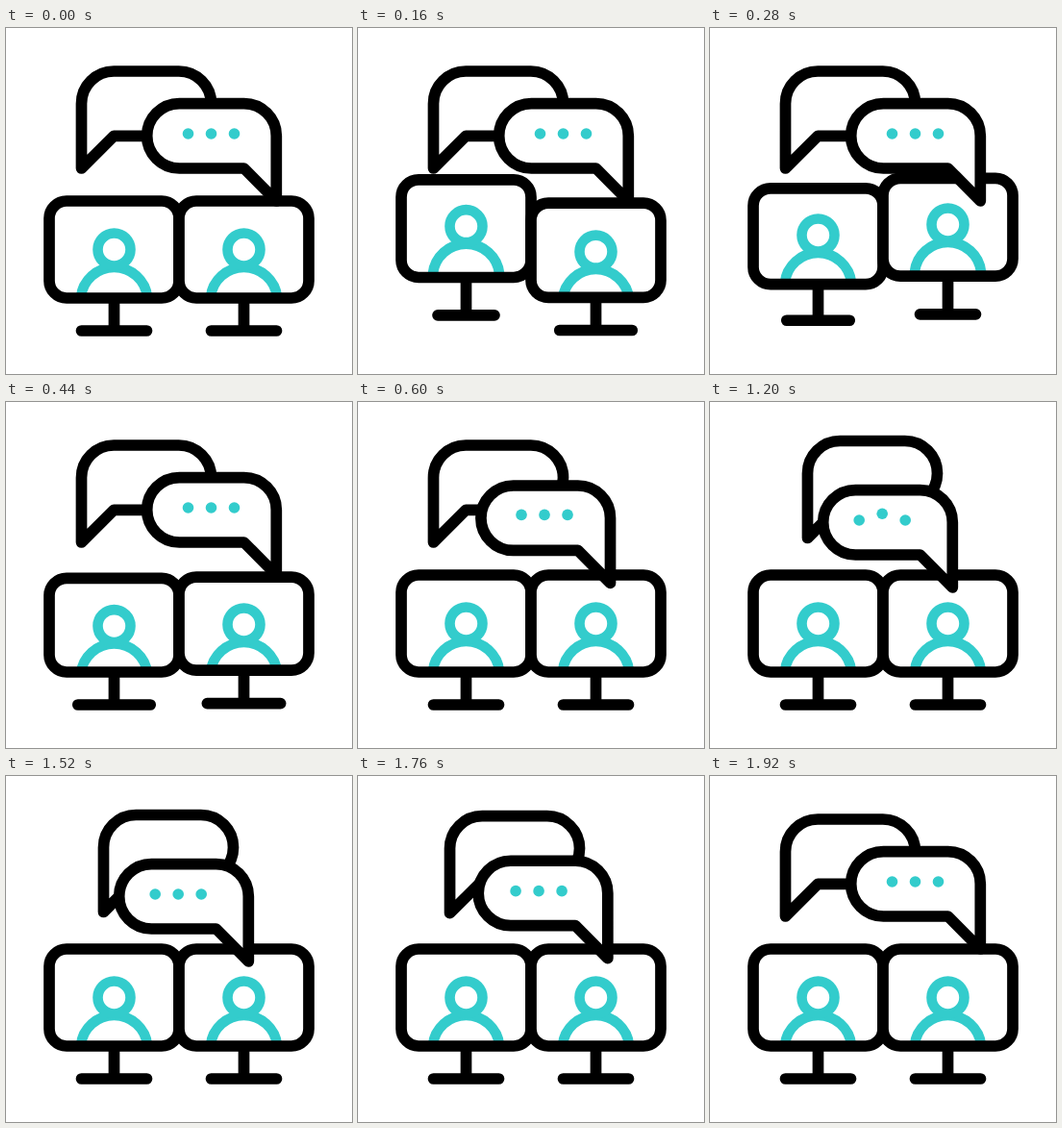
These frames come from a looping animation (360x360 px, 2000 ms). An HTML page:

```html
<!DOCTYPE html>
<html>
<head>
<meta charset="utf-8">
<style>
html, body { margin: 0; width: 100%; height: 100%; overflow: hidden; background: #fff; }
svg { display: block; width: 100vw; height: 100vh; }
.ink { fill: #fff; stroke: #000; stroke-width: 11.7; stroke-linecap: round; stroke-linejoin: round; }
.teal { fill: none; stroke: #33cccc; stroke-width: 10.6; }
.dot { fill: #33cccc; }
</style>
</head>
<body>
<svg viewBox="0 0 360 360">
  <g id="monitors"></g>
  <path id="back" class="ink" d="M78.5 146V78.7A33.7 33.7 0 0 1 112.2 45H179.8A33.7 33.7 0 0 1 179.8 112.4H112.2Z"/>
  <path id="front" class="ink" d="M281.3 180V112.3A33.7 33.7 0 0 0 247.6 78.6H180.4A33.7 33.7 0 0 0 180.4 146H247.6Z"/>
  <g id="dots"></g>
</svg>
<script>
const LOOP = 2000, STEP = 40;
const $ = id => document.getElementById(id);

function add(parent, tag, attrs) {
  const el = document.createElementNS('http://www.w3.org/2000/svg', tag);
  for (const k in attrs) el.setAttribute(k, attrs[k]);
  return parent.appendChild(el);
}

const shift = (el, x, y) => el.setAttribute('transform', `translate(${x} ${y})`);

// Smooth 0..1 ramp between times a and b
function ramp(t, a, b) {
  const p = Math.min(1, Math.max(0, (t - a) / (b - a)));
  return p * p * (3 - 2 * p);
}

// Jump poses: time, then offsets of box top, box bottom, foot, foot half-width and person
const JUMP = [
  [0, 0, 0, 0, 0, 0],
  [80, 3, 0, 0, 4, 3],
  [180, -25, -24, -18, -5.5, -27.5],
  [410, 4.5, 0, 0, 5, 3.5],
  [500, 0, 0, 0, 0, 0]
];

function jumpPose(t) {
  const pose = [0, 0, 0, 0, 0];
  for (let i = 1; i < JUMP.length; i++) {
    const a = JUMP[i - 1], b = JUMP[i], p = ramp(t, a[0], b[0]);
    pose.forEach((_, k) => pose[k] += (b[k + 1] - a[k + 1]) * p);
  }
  return pose;
}

function makeMonitor(cx, delay) {
  const g = add($('monitors'), 'g', { transform: `translate(${cx} 0)` });
  const stand = add(g, 'path', { class: 'ink' });
  const fill = add(g, 'rect', { x: -67.5, width: 135, rx: 18, fill: '#fff' });
  const person = add(g, 'g', {});
  add(person, 'path', { class: 'teal', d: 'M-34.6 280A34.8 34.8 0 0 1 34.6 280' });
  add(person, 'circle', { class: 'teal', cy: 230.5, r: 17 });
  const frame = add(g, 'rect', { x: -67.5, width: 135, rx: 18, class: 'ink', style: 'fill:none' });
  return t => {
    const [top, bottom, foot, wide, body] = jumpPose(t - delay);
    for (const r of [fill, frame]) {
      r.setAttribute('y', 180 + top);
      r.setAttribute('height', 101 + bottom - top);
    }
    shift(person, 0, body);
    const y = 315 + foot, w = 34 + wide;
    stand.setAttribute('d', `M0 ${281 + bottom}V${y}M${-w} ${y}H${w}`);
  };
}

const monitors = [makeMonitor(112.5, 0), makeMonitor(247.5, 70)];
const dots = [189.5, 213.5, 237.5].map(cx => add($('dots'), 'circle', { class: 'dot', cx, cy: 110, r: 5.8 }));

function draw(t) {
  monitors.forEach(m => m(t));
  const home = ramp(t, 1680, 1920);
  const front = ramp(t, 450, 700) - home;
  const back = ramp(t, 600, 840) - home;
  const row = ramp(t, 450, 725) - home;
  shift($('front'), -29 * front, 13 * front);
  shift($('back'), 23 * back, -4.5 * back);
  dots.forEach((dot, i) => {
    const p = Math.min(1, Math.max(0, (t - 840 - 180 * i) / 320));
    shift(dot, -34.3 * row, 13 * row - 7 * Math.sin(Math.PI * p) ** 2);
  });
}

const start = performance.now();
function tick() {
  const t = (performance.now() - start) % LOOP;
  draw(Math.floor(t / STEP) * STEP);
  requestAnimationFrame(tick);
}
tick();
</script>
</body>
</html>
```
